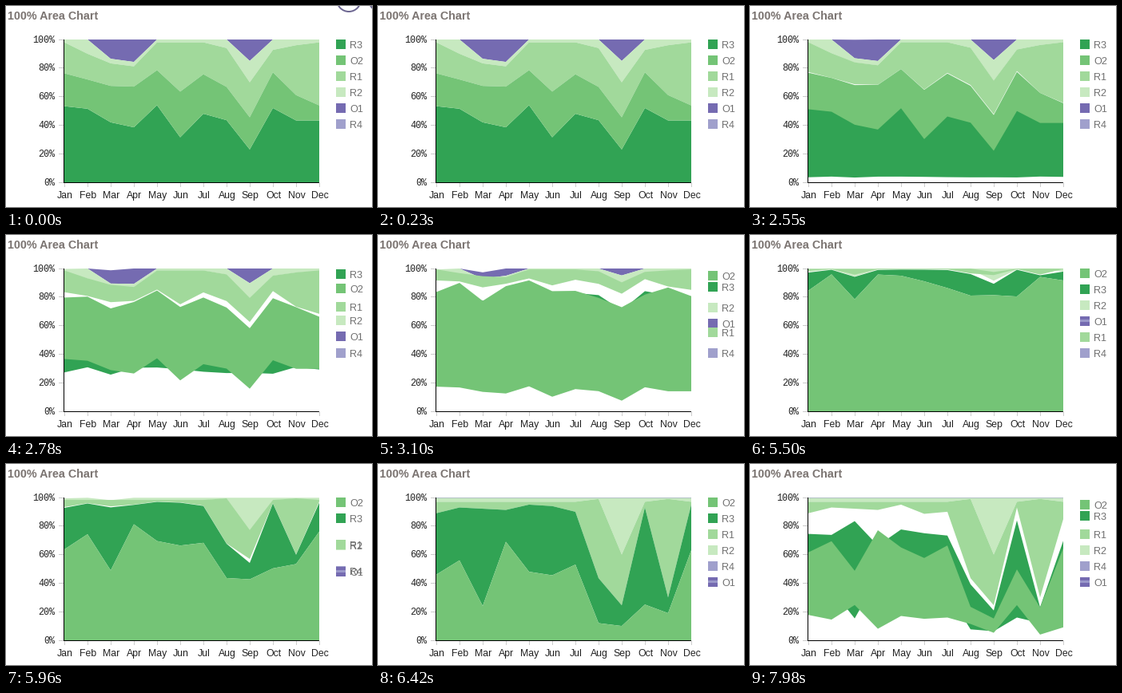
Write a matplotlib script that moves like this. It is 458 px wide and 252 px high and loops after 8000 ms.

```python
import numpy as np
import matplotlib.pyplot as plt
from matplotlib.animation import FuncAnimation
from matplotlib.patches import Polygon, Rectangle, Circle

W, H, DPI = 458, 252, 100
STEP, LOOP = 25, 8000
X0, X1, TOP, BASE = 73, 392, 42, 221
MONTHS = "Jan Feb Mar Apr May Jun Jul Aug Sep Oct Nov Dec".split()
COLORS = {"R4": "#a0a0cc", "O1": "#756bb1", "R2": "#c7e9c0",
          "R1": "#a1d99b", "R3": "#31a354", "O2": "#74c476"}
xs = np.linspace(X0, X1, 12)


def trend(**points):
    """Straight runs between the given months."""
    return np.interp(range(12), [MONTHS.index(m) for m in points],
                     list(points.values()))


def level(base, **dips):
    """A flat level that differs only in the given months."""
    return np.array([dips.get(m, base) for m in MONTHS], float)


def stack(order, *tops):
    """Map each series to (bottom, top, legend row); missing tops are 100%."""
    state, low = {}, np.zeros(12)
    for row, name in enumerate(order.split()):
        high = tops[row] if row < len(tops) else level(100)
        state[name] = (low, high, row)
        low = high
    return state


r3 = trend(Jan=53.3, Feb=51.5, Mar=42, Apr=38.5, May=54, Jun=31.5, Jul=48,
           Aug=43.5, Sep=23, Oct=52, Nov=43.3)
o2 = r3 + trend(Jan=23, Feb=20.5, Mar=25.5, Apr=28.5, May=24.5, Jun=32,
                Aug=23.3, Sep=22.5, Oct=25, Dec=10.5)
FIRST = stack("R3 O2 R1 R2 O1 R4", r3, o2,
              level(98, Feb=90, Mar=83.3, Apr=81.2, Aug=94, Sep=70, Oct=92.7, Nov=96),
              level(100, Mar=86.5, Apr=84.3, Sep=85))

o2 = trend(Jan=87, Feb=98.5, Mar=82, Apr=97.5, May=98, Jun=94, Jul=88.5,
           Aug=85.5, Sep=86, Oct=84, Nov=99, Dec=93.5)
r3 = level(99.5, Jan=97.7, Mar=94.3, Sep=93.5, Dec=98)
r2 = level(100, Jan=99, Mar=96)
SECOND = stack("O2 R3 R2 O1 R1 R4", o2, r3, r2, r2)

o2 = trend(Jan=46, Feb=56, Mar=24, Apr=69, May=48, Jun=45.5, Jul=53,
           Aug=12, Sep=10, Oct=25, Nov=19, Dec=63)
r3 = trend(Jan=89, Feb=93, Apr=91.3, May=95, Jun=94, Jul=90, Aug=43.5,
           Sep=24.5, Oct=93, Nov=30, Dec=95)
r1, r2 = level(97, Aug=99, Sep=60, Nov=99), level(99.7)
THIRD = stack("O2 R3 R1 R2 R4 O1", o2, r3, r1, r2)

# the two big series trade places with slightly different shares
swapped = r3 - o2 + level(0, Jan=6, Feb=3, Jun=-7, Jul=7, Dec=-7)
FOURTH = stack("R3 O2 R1 R2 R4 O1", swapped, r3 - level(0, Jun=15, Dec=28), r1, r2)

# begin, duration, from, to
MOVES = [(2515, 865, FIRST, SECOND),
         (5445, 900, SECOND, THIRD),
         (7625, 980, THIRD, FOURTH)]
# the chart refreshes unevenly: bursts of steps with short stalls between
TICKS = np.concatenate([
    [0, 230], np.linspace(2550, 3100, 8), np.linspace(3250, 3480, 4),
    np.linspace(5500, 5730, 4), np.linspace(5880, 6270, 6), [6420, 7670],
    np.linspace(7820, 7980, 3)])


def cubic(t):
    t = np.clip(t, 0, 1)
    return 4 * t ** 3 if t < 0.5 else 1 - 4 * (1 - t) ** 3


def to_y(pct):
    return BASE - pct * (BASE - TOP) / 100


fig = plt.figure(figsize=(W / DPI, H / DPI), dpi=DPI, facecolor="white")
ax = fig.add_axes([0, 0, 1, 1])
ax.set(xlim=(0, W), ylim=(H, 0))
ax.axis("off")


def label(x, y, text, px, color, font="Liberation Sans", **kw):
    return ax.text(x, y, text, fontsize=px * 72 / DPI, color=color,
                   family=font, va="baseline", **kw)


def line(xa, ya, xb, yb, color):
    ax.plot([xa, xb], [ya, yb], color=color, lw=72 / DPI, zorder=5,
            solid_capstyle="butt", snap=False)


label(2, 17, "100% Area Chart", 14.2, "#7b7471", weight="bold")
for pct in range(0, 101, 20):
    y = np.floor(to_y(pct)) + 0.5
    line(66, y, 72, y, "#cccccc")
    label(61.5, y + 3.8, f"{pct}%", 11.7, "#222222", "Liberation Mono", ha="right")
for x, month in zip(xs, MONTHS):
    x = np.floor(x) + 0.5
    line(x, BASE + 1, x, BASE + 6, "#cccccc")
    label(x, 241, month, 12.2, "#222222", ha="center")
line(72.5, TOP, 72.5, BASE + 1, "black")
line(72, BASE + 0.5, X1, BASE + 0.5, "black")

areas, keys, names = {}, {}, {}
for z, (name, color) in enumerate(COLORS.items()):
    areas[name] = ax.add_patch(Polygon(np.zeros((24, 2)), fc=color, lw=0,
                                       zorder=1 + z / 10))
    keys[name] = ax.add_patch(Rectangle((413, 0), 12, 12, fc=color, lw=0))
    names[name] = label(430, 0, name, 12.6, "#707070")
stripe = ax.add_patch(Rectangle((413, 0), 12, 3, fc="#9a98ca", lw=0, zorder=3))
buttons = [ax.add_patch(Circle((x, -8), 15, fill=False, ec="#6b6590", lw=1.4))
           for x in (429, 469)]


def draw(i):
    now = i * STEP + 20
    t = TICKS[TICKS <= now + 1e-6][-1]
    begin, span, old, new = [m for m in MOVES if m[0] <= max(t, MOVES[0][0])][-1]
    p = np.clip((t - begin) / span, 0, 1)
    q = cubic((t - begin - 115) / 700)
    for name in COLORS:
        lo, hi, row = (a + (b - a) * p for a, b in zip(old[name], new[name]))
        areas[name].set_xy(np.column_stack([np.r_[xs, xs[::-1]],
                                            to_y(np.r_[hi, lo[::-1]])]))
        row = old[name][2] + (new[name][2] - old[name][2]) * q
        y = round(48 + 20 * row)
        keys[name].set_y(y - 6)
        names[name].set_y(y + 5)
    stripe.set_y(keys["O1"].get_y() + 4)
    stripe.set_visible(t >= 3250)
    for b in buttons:
        b.set_visible(t < 230)
    return []


anim = FuncAnimation(fig, draw, frames=LOOP // STEP, interval=STEP,
                     repeat=True, repeat_delay=0, blit=False)
plt.show()
```
